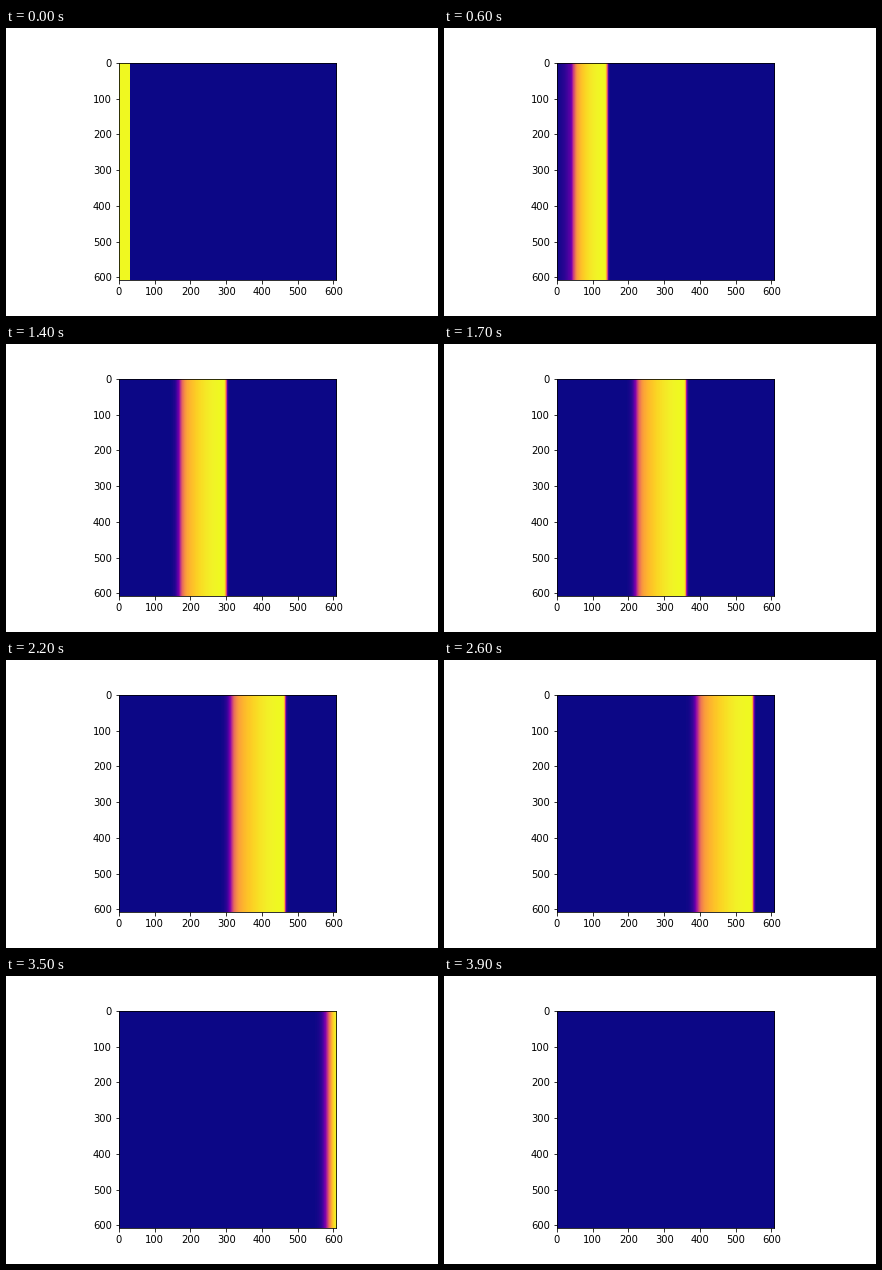
Animation of 432 by 288 pixels, one loop 4.8 s. Source, as a matplotlib script:

```python
import numpy as np
import matplotlib.pyplot as plt
from matplotlib.animation import FuncAnimation

SIZE = 608           # cells along each side
STIM = 32            # width of the initially excited strip
STEPS = 48
FRONT_WIDTH = 1.5    # cells
BACK_WIDTH = 0.29    # steps
REST = 5e-4          # weaker excitation counts as none

# Slightly accelerating edges: position = a * t**2 + b * t + c
FRONT = (0.0417, 19.04, 24.25)
BACK = (0.133, 13.09, -40.3)

x = np.arange(SIZE)


def arrival(path):
    """Step at which an edge reaches each cell."""
    a, b, c = path
    return (np.sqrt(b * b + 4 * a * (x - c)) - b) / (2 * a)


def sigmoid(z):
    return 1 / (1 + np.exp(-np.clip(z, -60, 60)))


start = np.maximum(arrival(FRONT), 0)
# The strip fires all at once, so it also recovers almost together
end = np.maximum(arrival(BACK), 4.8 + 0.024 * x)


def wave(t):
    """Excitation along x: steep front, sagging plateau, softer back."""
    if t == 0:
        return (x < STIM).astype(float)
    age = np.clip((t - start) / (end - start), 0, 1)
    plateau = 1 - 0.3 * age ** 2.2
    rise = sigmoid((np.polyval(FRONT, t) - x) / FRONT_WIDTH)
    fall = sigmoid((end - t) / BACK_WIDTH)
    return plateau * rise * fall


def field(step):
    """Wave scaled to its own peak, the same in every row."""
    u = wave(step)
    peak = u.max()
    u = u / peak if peak > REST else np.zeros(SIZE)
    return np.tile(u, (SIZE, 1))


plt.rcParams.update({"font.family": "DejaVu Sans", "font.size": 10})
fig, ax = plt.subplots(figsize=(6, 4), dpi=72, facecolor="white")
fig.subplots_adjust(left=0.125, right=0.9, bottom=0.125, top=0.88)
image = ax.imshow(field(0), cmap="plasma", vmin=0, vmax=1,
                  interpolation="nearest")
ticks = range(0, SIZE, 100)
ax.set_xticks(ticks)
ax.set_yticks(ticks)


def update(step):
    image.set_data(field(step))
    return [image]


anim = FuncAnimation(fig, update, frames=STEPS, interval=100,
                     repeat=True, repeat_delay=0)
plt.show()
```
